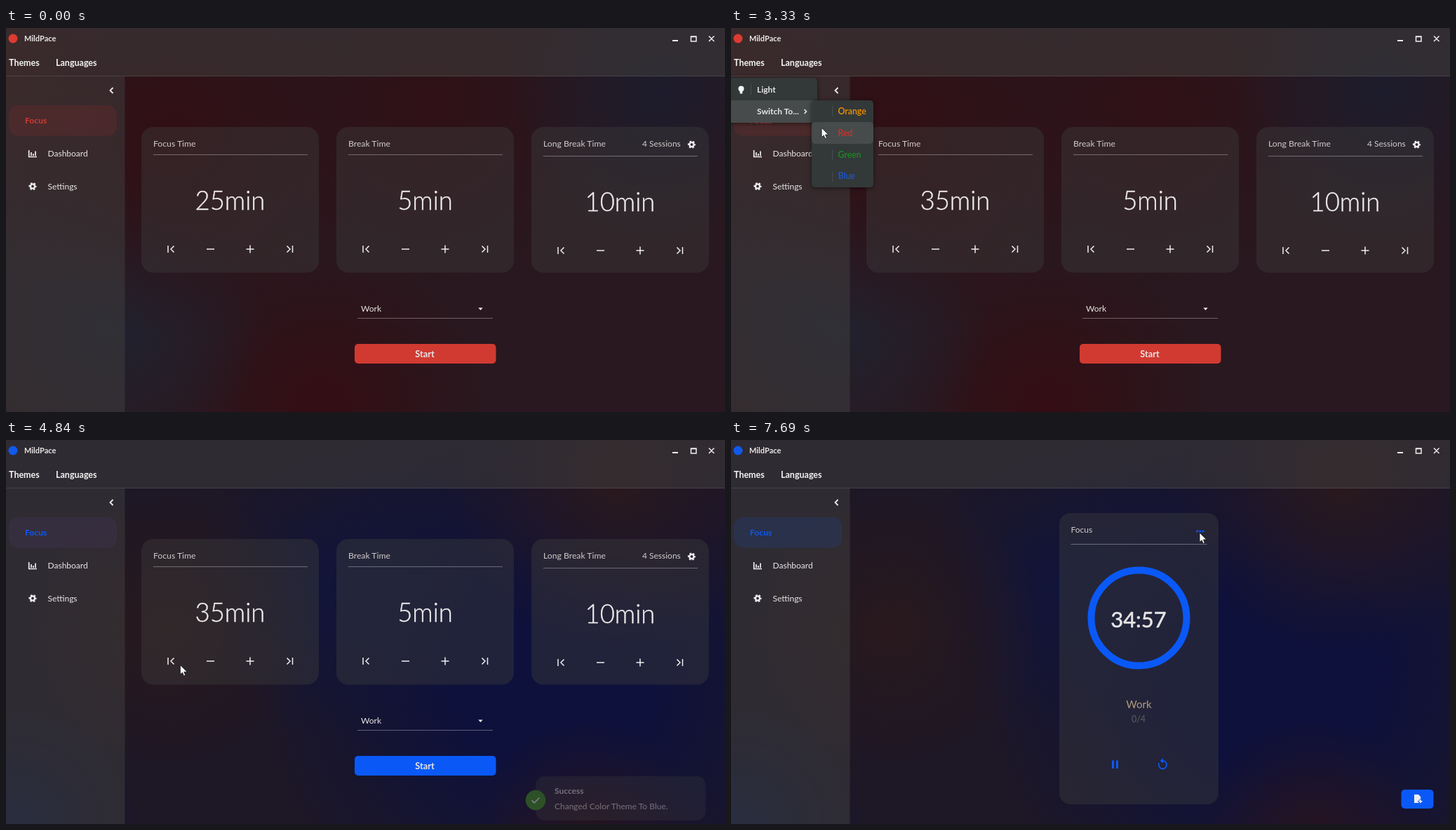
Animation of 1025 by 547 pixels, one loop 8 s. Source, as an HTML page:

```html
<!DOCTYPE html>
<html lang="en">
<head>
<meta charset="utf-8">
<title>Focus timer</title>
<style>
  html, body { margin: 0; width: 100%; height: 100%; overflow: hidden; background: #27171e; }
  #stage { position: relative; width: 1025px; height: 547px; overflow: hidden; }
  #stage.red {
    --accent: #d13a31; --logo: #dc3b31;
    background:
      radial-gradient(circle 290px at 240px 150px, #310f14, transparent),
      radial-gradient(circle 220px at 150px 420px, #20222f, transparent),
      radial-gradient(circle 210px at 930px 90px, #1d1c2c, transparent),
      radial-gradient(circle 230px at 450px 540px, #340d13, transparent),
      radial-gradient(circle 260px at 600px 110px, #2f1016, transparent),
      radial-gradient(circle 200px at 0 60px, #391417, transparent),
      #29181f;
  }
  #stage.blue {
    --accent: #0a59f7; --logo: #1059ee;
    background:
      radial-gradient(circle 240px at 870px 60px, #2a191d, transparent),
      radial-gradient(circle 210px at 230px 270px, #29191d, transparent),
      radial-gradient(circle 220px at 480px 210px, #11143a, transparent),
      radial-gradient(circle 170px at 830px 570px, #27141f, transparent),
      radial-gradient(circle 420px at 780px 330px, #0e113b 35%, transparent),
      radial-gradient(circle 180px at 10px 550px, #101b42, transparent),
      #1d1726;
  }
  svg { position: absolute; inset: 0; display: block; }
  text { font: 400 12px Lato, sans-serif; fill: #e8e6e6; white-space: pre; }
  .b { font-weight: 700; }
  .dim { fill: #cfcbcb; }
  .mid { text-anchor: middle; }
  .big { font-size: 36.5px; font-weight: 300; fill: #eeecec; stroke: #eeecec; stroke-width: .4px; }
  .menu { font-size: 12.5px; font-weight: 700; fill: #f4f4f4; }
  .glass { fill: #3c3c3c; fill-opacity: .42; }
  .chrome { fill: #3e3c3c; fill-opacity: .55; }
  .line { stroke: #fff; stroke-opacity: .32; }
  .ico { fill: none; stroke: #eee; stroke-width: 1.5; }
  .acc { fill: var(--accent); }
  .accline { fill: none; stroke: var(--accent); }
  .panel { fill: #333838; }
  .hot { fill: #474b4b; }
  .sep { stroke: #474d4d; }
</style>
</head>
<body>
<div id="stage" class="red"></div>
<script>
const stage = document.getElementById('stage');

const text = (x, y, s, cls = '', extra = '') => `<text x="${x}" y="${y}" class="${cls}" ${extra}>${s}</text>`;
const rect = (x, y, w, h, r, cls, extra = '') => `<rect x="${x}" y="${y}" width="${w}" height="${h}" rx="${r}" class="${cls}" ${extra}/>`;
const path = (d, cls = 'ico', extra = '') => `<path d="${d}" class="${cls}" ${extra}/>`;
const group = (id, ...parts) => `<g id="${id}">${parts.join('')}</g>`;

const gear = (x, y) => `<g transform="translate(${x} ${y})" fill="none" stroke="#eee">
  <circle r="3.1" stroke-width="2.4"/>
  <circle r="4.7" stroke-width="1.8" stroke-dasharray="2.6 2.32" stroke-dashoffset="1.3"/></g>`;

function card(x, title, value, dy, id) {
  const y = 315 + dy;
  return rect(x, 141, 253, 207.5, 17, 'glass') +
    text(x + 17, 169, title, 'dim', 'style="font-size:12.2px"') +
    path(`M${x + 17} ${180.5 + dy}h220`, 'line') +
    text(x + 126.5, 258.5 + dy, value, 'big mid', id ? `id="${id}"` : '') +
    path(`M${x + 38} ${y - 5}v10M${x + 46.5} ${y - 4.5}l-4.5 4.5 4.5 4.5
      M${x + 93} ${y}h11M${x + 149.5} ${y}h11m-5.5 -5.5v11
      M${x + 207.5} ${y - 4.5}l4.5 4.5 -4.5 4.5M${x + 215.5} ${y - 5}v10`);
}

const swatches = [['Orange', '#f39200'], ['Red', '#c9332c'], ['Green', '#1f8a22'], ['Blue', '#1a56da']];

stage.innerHTML = `<svg width="1025" height="547" viewBox="0 0 1025 547">
<clipPath id="low"><rect width="1025" height="545"/></clipPath>` +
  rect(0, 0, 1025, 69, 0, 'chrome') + rect(0, 69, 169.5, 478, 0, 'chrome') +
  path('M0 68.5H1025', 'line', 'style="stroke-opacity:.1"') +
  '<circle cx="10" cy="15" r="6.5" fill="var(--logo)"/>' +
  text(26, 18.7, 'MildPace', 'b', 'style="font-size:11px"') +
  path('M950 18h8', 'ico', 'style="stroke-width:2"') +
  path('M976.5 12h7.5v7h-7.5zM976 12.5h8.5M1002 11.5l7.5 7.5m0 -7.5l-7.5 7.5') +
  rect(-6, 37, 61, 28, 5, 'hot', 'id="themesHot"') +
  text(4, 54, 'Themes', 'menu') + text(71, 54, 'Languages', 'menu') +
  path('M152.5 85l-4 4 4 4', 'ico', 'style="stroke-width:1.8"') +
  rect(4, 110, 154, 43.5, 13, '', 'id="pill"') +
  text(27, 136, 'Focus', 'b acc', 'letter-spacing=".1"') +
  path('M32.7 174v9.5H44M36 177v5M39 179v3M42 175.5v6.5', 'ico', 'style="stroke-width:1.7"') +
  text(59.5, 183, 'Dashboard') + gear(38, 225.5) + text(59.5, 230, 'Settings') +
  group('setup',
    rect(380, 300, 49, 30, 5, '', 'id="press" fill="#fff" fill-opacity=".09"'),
    card(193, 'Focus Time', '25min', 0, 'minutes'),
    card(471, 'Break Time', '5min', 0),
    card(749, 'Long Break Time', '10min', 2),
    text(907, 169, '4 Sessions', 'dim'), gear(977.5, 166),
    text(506, 404, 'Work'), path('M501 413.5h193', 'line'),
    path('M673.3 398.5h6.4l-3.2 3.4z', '', 'fill="#eee"'),
    rect(497, 450, 201.5, 28, 5, 'acc'),
    text(597, 468.7, 'Start', 'b mid', 'style="font-size:12.8px"')) +
  group('session',
    rect(468, 104, 227, 415, 16, 'glass'),
    text(484.5, 132, 'Focus', 'dim'),
    [664.7, 668.8, 672.9].map(x => `<circle cx="${x}" cy="130" r="1.6" class="acc"/>`).join(''),
    path('M484.5 148.5h194', 'line'),
    '<circle cx="581.5" cy="253.5" r="68" class="accline" stroke-width="10"/>',
    text(581, 266.5, '', 'mid', 'id="clock" style="font-size:31px;stroke:#e8e6e6;stroke-width:.5px"'),
    text(581.5, 381.5, 'Work', 'mid', 'style="font-size:15px;fill:#b09c7c"'),
    text(581, 402.3, '0/4', 'mid', 'style="font-size:12.5px;fill:#625e5e"'),
    path('M544.5 456.5v11.5M550.5 456.5v11.5', 'accline', 'stroke-width="3"'),
    path('M610.3 460.2A5.7 5.7 0 1 0 615.5 457', 'accline', 'stroke-width="1.7"'),
    path('M616 453.2v7.4l-4.3 -3.7z', 'acc'),
    rect(955.5, 498, 46, 27, 5, 'acc'),
    path('M974 505h6l3.2 3.2v3.3h-1.7v2.2h-2.2v2.3h1.2v1h-6.5z', '', 'fill="#eee"'),
    path('M983 512.3v5M980.5 514.8h5', 'ico')) +
  '<g clip-path="url(#low)">' + group('toast',
    rect(755, 479, 242.5, 63, 13, '', 'fill="#3a3a3e" fill-opacity=".62"'),
    '<circle cx="755" cy="513" r="14.3" fill="#3f8f24"/>',
    path('M749.5 513.3l3.6 3.6 7.3 -7.5', 'ico'),
    text(782, 503.7, 'Success', 'b dim'),
    text(782, 526, 'Changed Color Theme To Blue.', 'dim')) + '</g>' +
  group('themeMenu',
    rect(-8, 71, 131, 64, 5, 'panel', 'style="filter:drop-shadow(0 1px 3px #0008)"'),
    rect(-8, 71, 131, 32, 5, 'hot', 'id="lightHot"'),
    rect(-8, 103, 131, 32, 5, 'hot', 'id="switchHot"'),
    path('M28.5 80v15', 'sep'),
    '<circle cx="14.5" cy="86.5" r="4" fill="#f4f4f4"/>',
    path('M12.7 89.5h3.6v4h-3.6z', '', 'fill="#f4f4f4"'),
    text(37, 91.5, 'Light', 'b'), text(37, 123, 'Switch To...', 'b'),
    path('M104.5 116l3 3 -3 3')) +
  group('subMenu',
    rect(115, 103, 88, 124, 5, 'panel', 'style="filter:drop-shadow(0 1px 3px #0008)"'),
    rect(115, 103, 88, 31, 5, 'hot', 'id="rowHot"'),
    swatches.map(([name, color], i) =>
      path(`M144.5 ${111 + 31 * i}v15`, 'sep') +
      text(152.5, 123 + 30.8 * i, name, '', `style="fill:${color};font-weight:600;font-size:12.3px"`)).join('')) +
  path('M0 0V13.6L3.1 10.8 5.1 15.4 7.4 14.4 5.4 9.9H9.8Z', '',
    'id="cursor" fill="#fff" stroke="#111" stroke-width=".8"') +
  '</svg>';

const el = {};
stage.querySelectorAll('[id]').forEach(n => el[n.id] = n);

const LOOP = 8000;
const T = { press: 740, release: 870, open: 2540, sub: 3000, theme: 4570, start: 5560, leave: 6170 };

// time, x, y
const route = [
  [70, 790, 538], [160, 650, 470], [250, 500, 375], [330, 420, 326], [400, 399, 315],
  [1600, 399, 315], [1750, 350, 280], [2050, 130, 118], [2200, 50, 63], [2270, 36, 56],
  [2540, 36, 57], [2750, 50, 88], [2900, 64, 112], [3100, 85, 122], [3270, 104, 131],
  [3330, 129, 142], [3550, 150, 168], [3750, 167, 200], [3850, 170, 206],
  [4600, 170, 206], [4700, 192, 240], [4840, 247.5, 320], [5050, 430, 420], [5240, 555, 456],
  [5400, 595, 464], [5900, 597, 464], [6110, 624, 436], [6240, 631, 408],
  [6450, 648, 270], [6650, 662, 160], [6900, 666, 137], [7250, 667, 136], [7550, 668, 132]
];

function pointer(t) {
  const i = route.findIndex(p => p[0] > t);
  if (i < 0) return route[route.length - 1].slice(1);
  if (i === 0) return route[0].slice(1);
  const a = route[i - 1], b = route[i], k = (t - a[0]) / (b[0] - a[0]);
  return [a[1] + (b[1] - a[1]) * k, a[2] + (b[2] - a[2]) * k];
}

const clamp = v => Math.max(0, Math.min(1, v));
const show = (node, on) => { node.style.display = on ? '' : 'none'; };
const put = (node, s) => { if (node.textContent !== s) node.textContent = s; };

function draw(t) {
  const [x, y] = pointer(t);
  const blue = t >= T.theme, menu = t >= T.open && !blue, sub = t >= T.sub && !blue;
  stage.className = blue ? 'blue' : 'red';

  show(el.cursor, t >= 70);
  el.cursor.setAttribute('transform', `translate(${x} ${y})`);
  show(el.press, t >= T.press && t < T.release);
  put(el.minutes, t < T.release ? '25min' : '35min');

  show(el.themesHot, t < T.open && x < 55 && y < 65);
  show(el.themeMenu, menu);
  show(el.lightHot, !sub && y > 71 && y < 103);
  show(el.switchHot, sub || y >= 103);
  show(el.subMenu, sub);
  show(el.rowHot, x > 115);
  el.rowHot.setAttribute('y', 103 + 31 * Math.floor((y - 103) / 31));

  const k = clamp((t - T.theme) / 500);
  const mix = (a, b) => Math.round(a + (b - a) * k);
  el.pill.setAttribute('fill', `rgba(${mix(209, 10)},${mix(40, 89)},${mix(40, 247)},.12)`);

  show(el.setup, t < T.start);
  show(el.session, t >= T.start);
  put(el.clock, t < 6600 ? '34:59' : t < 7550 ? '34:58' : '34:57');

  const out = Math.max(0, t - T.leave);
  el.toast.setAttribute('opacity', clamp((t - 4640) / 400) * clamp(1 - out / 350));
  el.toast.setAttribute('transform', `translate(0 ${out * .2})`);
}

function tick() {
  draw(performance.now() % LOOP);
  requestAnimationFrame(tick);
}
tick();
</script>
</body>
</html>
```
